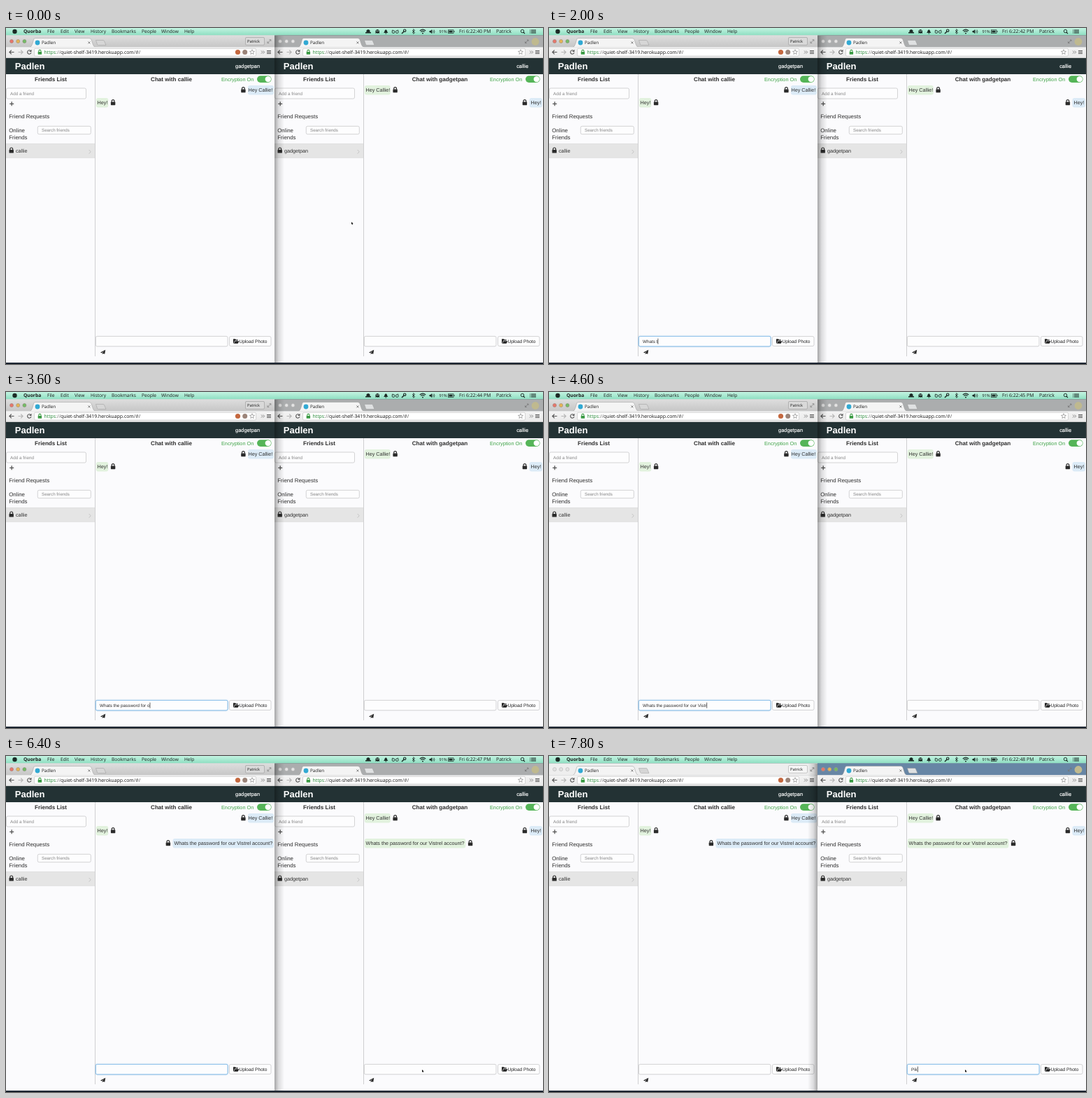
These frames come from a looping animation (768x480 px, 8 s). An HTML page:

```html
<!DOCTYPE html>
<html lang="en">
<head>
<meta charset="utf-8">
<title>Encrypted chat</title>
<style>
  html, body { margin: 0; width: 100%; height: 100%; overflow: hidden; background: #fbfbfd; }
  svg { display: block; width: 768px; height: 480px; }
  text { font-family: "Liberation Sans", Arial, sans-serif; text-rendering: geometricPrecision; white-space: pre; }
  .ui { font-family: "Open Sans", "Noto Sans", sans-serif; }
  .focus { opacity: 0; }
</style>
</head>
<body>
<svg id="stage" viewBox="0 0 768 480" xmlns="http://www.w3.org/2000/svg"></svg>
<script>
const APP = 'Padlen', OWNER = 'Patrick';
const USERS = ['gadgetpan', 'callie'];
const QUESTION = 'Whats the password for our Vistrel account?';
const INK = '#2e2e2e';

const attrs = o => Object.entries(o).map(([k, v]) => `${k}="${v}"`).join(' ');
const rect = (x, y, width, height, fill, more = {}) =>
  `<rect ${attrs({ x, y, width, height, fill, ...more })}/>`;
const dot = (cx, cy, r, fill, more = {}) => `<circle ${attrs({ cx, cy, r, fill, ...more })}/>`;
const shape = (d, fill, more = {}) => `<path ${attrs({ d, fill, ...more })}/>`;
const line = (d, stroke, w = 1, more = {}) =>
  shape(d, 'none', { stroke, 'stroke-width': w, ...more });
const text = (x, y, s, size, more = {}) =>
  `<text ${attrs({ x, y, 'font-size': size, fill: INK, ...more })}>${s}</text>`;
const ui = (x, y, s, size, more = {}) => text(x, y, s, size, { class: 'ui', fill: '#1a1a1a', ...more });
const group = (x, y, body, more = {}) => `<g transform="translate(${x} ${y})" ${attrs(more)}>${body}</g>`;

const END = { 'text-anchor': 'end' }, MID = { 'text-anchor': 'middle' }, BOLD = { 'font-weight': 700 };

// Icons are centred on the given point
const padlock = (x, y, color = '#2b2b2b') => group(x, y,
  rect(-3.2, -.8, 6.4, 4.6, color, { rx: .6 }) + line('M-1.9 -.6V-1.9A1.9 1.9 0 0 1 1.9 -1.9V-.6', color, 1.2));
const star = (x, y) => {
  let d = '';
  for (let i = 0; i < 10; i++) {
    const r = i % 2 ? 1.6 : 3.7, a = i * Math.PI / 5 - Math.PI / 2;
    d += (i ? 'L' : 'M') + (x + r * Math.cos(a)).toFixed(2) + ' ' + (y + r * Math.sin(a)).toFixed(2);
  }
  return shape(d + 'Z', '#fff', { stroke: '#888', 'stroke-width': .7 });
};
const bars = (x, y, color, w = 6) =>
  [-2, 0, 2].map(k => rect(x - w / 2, y + k - .5, w, 1, color)).join('');

function menuBar() {
  const items = [[59, 'File'], [78, 'Edit'], [98, 'View'], [121, 'History'], [151, 'Bookmarks'],
    [194, 'People'], [222, 'Window'], [255, 'Help']];
  const c = '#1c2b26';
  return rect(0, 0, 768, 10.2, 'url(#mint)') + dot(12.5, 5, 3.2, c) +
    ui(25, 7.4, 'Quorba', 6.7, BOLD) +
    items.map(([x, s]) => ui(x, 7.4, s, 6.6)).join('') +
    shape('M515.5 6V3.5Q518 .5 520.5 3.5V6H522V7.5H514V6Z', c) +
    shape('M528.5 8V4Q531.3 0 534 4V8L532.5 7L531.3 8L530 7Z', c) + dot(530.4, 4.3, .7, '#bfe9d8') + dot(532.4, 4.3, .7, '#bfe9d8') +
    shape('M540 7Q541.5 6 541.5 4Q543.3 .5 545 4Q545 6 546.5 7ZM542.5 7.5H544.2V8.5H542.5Z', c) +
    dot(554, 5.5, 1.9, 'none', { stroke: c, 'stroke-width': .9 }) +
    dot(559.3, 5.5, 1.9, 'none', { stroke: c, 'stroke-width': .9 }) + line('M552 4L553 2.5M561 4L560.4 2.5', c, .7) +
    line('M566 8L569.3 4.7', c, 1.5) + dot(570.2, 3.7, 1.7, 'none', { stroke: c, 'stroke-width': 1.2 }) +
    line('M581 3.2L584.6 6.6L582.8 8.4V1.6L584.6 3.4L581 6.8', c, .8) +
    line('M591.8 4Q596 .2 600.2 4M593.4 5.7Q596 3.2 598.6 5.7', c, 1.1) + dot(596, 7.4, 1, c) +
    shape('M605.5 4H607L609.3 2V8.2L607 6.2H605.5Z', c) + line('M610.5 3.5Q611.8 5 610.5 6.7M612 2.5Q614 5 612 7.7', c, .7) +
    ui(619.5, 7.2, '91%', 5.7) +
    rect(632.4, 2.8, 7.6, 4.6, 'none', { stroke: c, 'stroke-width': .7 }) + rect(633.4, 3.7, 5.2, 2.8, c) + rect(640.4, 4, 1, 2, c) +
    ui(648, 7.4, '', 6.9, { id: 'clock' }) + ui(701, 7.4, OWNER, 6.9) +
    dot(738.5, 4.5, 2.2, 'none', { stroke: c, 'stroke-width': 1 }) + line('M740 6L742 8.2', c, 1.2) +
    bars(754.5, 5, c, 7) + rect(749.2, 2.5, 1, 1, c) + rect(749.2, 4.5, 1, 1, c) + rect(749.2, 6.5, 1, 1, c);
}

function browser(side) {
  const first = side === 0, g = '#555', active = { class: 'light' + side };
  const lights = ['#e8776c', '#e6b656', '#74bd66'].map((c, i) =>
    dot(8 + i * 9.2, 19, 2.5, '#e3e3e3', { stroke: '#aaa', 'stroke-width': .5 }) +
    dot(8 + i * 9.2, 19, 2.5, c, { ...active, stroke: '#8a7a70', 'stroke-width': .4 })).join('');
  let s = rect(0, 10.2, 384, 17.3, first ? '#eeeeee' : '#abadae') +
    rect(0, 10.2, 384, 17.3, first ? 'url(#gray)' : '#6786a5', active) + lights +
    shape('M34 27.5Q36.5 27 38 22L39.5 16.5Q40 14.5 42 14.5H119Q121 14.5 122 16.5L124.5 24Q125.5 27 128 27.5Z', '#f4f4f4', { stroke: '#999', 'stroke-width': .5 }) +
    shape('M128.5 17.5H139Q140 17.5 140.5 18.5L143 24.5H132.5Q131 24.5 130.5 23.5Z', first ? '#d6d6d6' : '#dfe1e2', { stroke: '#999', 'stroke-width': .5 }) +
    dot(45, 21, 3.4, '#31a9d3') + ui(51, 23.2, APP, 6.3) +
    line('M117.4 19.4L120.4 22.4M120.4 19.4L117.4 22.4', '#666', .8) +
    rect(0, 27.2, 384, 16, 'url(#bar)') + line('M0 42.8H384', '#a6a6a6', .6) +
    rect(40.5, 29.3, first ? 317 : 318, 10.8, '#fff', { rx: 1.5, stroke: '#bdbdbd', 'stroke-width': .6 }) +
    line('M11.5 34.5H5M7.8 31.6L4.9 34.5L7.8 37.4', g, 1.2) +
    line('M17.5 34.5H24M21.2 31.6L24.1 34.5L21.2 37.4', '#b5b5b5', 1.2) +
    line('M35.3 32.6A2.7 2.7 0 1 0 36 35', g, 1.1) + shape('M36.5 30.7V34H33.2Z', g) +
    group(48.4, 34.6, `<g transform="scale(.85)">${padlock(0, 0, '#3a9a43')}</g>`) +
    ui(54.5, 37, '<tspan fill="#1f8530">https</tspan><tspan fill="#666">://</tspan>quiet-shelf-3419.herokuapp.com<tspan fill="#444">/#/</tspan>', 6.9, { fill: '#111' }) +
    star(352, 34.5) + line('M365 32.5L367 34.5L365 36.5M367.7 32.5L369.7 34.5L367.7 36.5', '#666', .8) + bars(376, 34.5, '#555');
  if (first) s += rect(342.5, 13.5, 27, 10.8, '#f5f5f5', { rx: 1.5, stroke: '#aaa', 'stroke-width': .6 }) +
    rect(342.5, 13.5, 27, 10.8, '#d9d9d9', { ...active, rx: 1.5, stroke: '#a0a0a0', 'stroke-width': .6 }) +
    ui(345, 21.2, OWNER, 5.7) + dot(331.5, 34.5, 3.6, '#c4683f') + dot(341.7, 34.5, 3.5, '#9b8479') +
    line('M374 21.5L378.8 16.7M376.5 16.7H378.8V19M374 19.2V21.5H376.3', '#888', .8);
  else s += dot(373, 19.5, 5.4, '#bfb98f') + line('M358.5 21.5L363 17M361 17H363V19M358.5 19.3V21.5H360.7', '#777', .8);
  return s;
}

const bubble = (x, y, w, fill) => rect(x, y, w, 13.4, fill, { rx: 3 });
function received(y, s, w, more = {}) {
  return `<g ${attrs(more)}>` + bubble(128.8, y, w, '#e2f2de') + text(130.6, y + 9.2, s, 7.2) + padlock(128.8 + w + 6.8, y + 6.4) + '</g>';
}
function sent(y, s, w, more = {}) {
  return `<g ${attrs(more)}>` + bubble(383 - w, y, w, '#dcebf7') + text(381.3, y + 9.2, s, 7.2, END) + padlock(383 - w - 6.6, y + 6.4) + '</g>';
}
const field = (x, y, w, h, more = {}) =>
  rect(x, y, w, h, '#fdfdfe', { rx: 2, stroke: '#c8c8ca', 'stroke-width': .8, ...more });

function page(side) {
  const me = USERS[side], pal = USERS[1 - side], hint = { fill: '#858585' };
  const chat = side === 0
    ? sent(82, 'Hey Callie!', 37) + received(100, 'Hey!', 17.5) + sent(118, QUESTION, 144.5, { id: 'ask0' })
    : received(82, 'Hey Callie!', 37) + sent(100, 'Hey!', 18.5) + received(118, QUESTION, 144.5, { id: 'ask1' });
  return rect(0, 43, 384, 435, '#fbfbfd') + rect(0, 43, 384, 23, '#233234') +
    text(12.8, 59.2, APP, 13, { ...BOLD, fill: '#fff' }) +
    text(363, 57.3, me, 7.4, { ...END, fill: '#fff', stroke: '#fff', 'stroke-width': .15 }) +
    text(64, 76, 'Friends List', 8.1, { ...MID, ...BOLD }) +
    text(236.5, 76, 'Chat with ' + pal, 8.1, { ...MID, ...BOLD }) +
    text(308, 75.6, 'Encryption On', 7.3, { fill: '#3fa347' }) +
    rect(359, 68.3, 20.6, 9.6, '#55b558', { rx: 4.8 }) + dot(374.8, 73.1, 4.2, '#fff') +
    line('M127.5 66V469', '#cfcfd1') +
    field(.5, 86, 114, 15) + text(6, 95.6, 'Add a friend', 6.3, hint) +
    line('M5.2 108.3H11.2M8.2 105.3V111.3', '#555', 1.3) +
    text(4.2, 128.8, 'Friend Requests', 7.9) + text(4.2, 148.6, 'Online', 7.9) + text(4.2, 158.6, 'Friends', 7.9) +
    field(45.3, 140.3, 76, 11.4) + text(51, 148.2, 'Search friends', 6.2, hint) +
    rect(0, 165.2, 127, 20.3, '#e5e5e5') + line('M0 165.4H127M0 185.4H127', '#d8d8d9', .6) +
    padlock(7.7, 174.8) + text(14, 178, pal, 7.2) + line('M118.7 174L121.2 176.8L118.7 179.6', '#bdbdbd', .8) +
    chat +
    field(128.4, 440.4, 188.6, 14.4) +
    field(128.4, 440.4, 188.6, 14.4, { class: 'focus', id: 'focus' + side, stroke: '#74b6ea', filter: 'url(#glow)' }) +
    text(134, 449.8, '', 6.3, { id: 'draft' + side }) + rect(134, 443.6, .7, 8, '#222', { id: 'caret' + side }) +
    field(319.5, 440.6, 59.5, 13.8) +
    shape('M325 450.5V444.3H328L329 445.3H331.8V446.6H327.3L325.5 450.5ZM327.7 447.2H333.6L331.6 450.8H325.9Z', '#222') +
    text(333.4, 450, 'Upload Photo', 6.6, { fill: '#222' }) +
    shape('M135 463.6L142.2 459.8L141.2 465.8L138.9 464.9L137.7 466.2V464.5L140.6 461.6L136.8 464.3Z', '#222');
}

const shade = (x, id, cls) => rect(x, 11, 14, 467, `url(#${id})`, { class: cls });
const ramp = (id, stops, dir = '') => `<linearGradient id="${id}" ${dir}>` +
  stops.map(([at, color, alpha = 1]) => `<stop ${attrs({ offset: at, 'stop-color': color, 'stop-opacity': alpha })}/>`).join('') +
  '</linearGradient>';
const DOWN = 'x2="0" y2="1"', FLIP = 'x1="1" x2="0"';
const FADE = [[0, '#000', .34], [.4, '#000', .13], [1, '#000', 0]];

document.getElementById('stage').innerHTML = '<defs>' +
  ramp('mint', [[0, '#c3f3e1'], [1, '#8fdfc2']], DOWN) +
  ramp('gray', [[0, '#dedede'], [1, '#c6c6c6']], DOWN) +
  ramp('bar', [[0, '#f4f4f4'], [1, '#e9e9e9']], DOWN) +
  ramp('fadeR', FADE) + ramp('fadeL', FADE, FLIP) +
  `<filter id="glow" x="-5%" y="-40%" width="110%" height="180%" color-interpolation-filters="sRGB"><feDropShadow dx="0" dy="0" stdDeviation=".8" flood-color="#66afe9" flood-opacity=".45"/></filter></defs>` +
  rect(0, 0, 768, 480, '#1b2430') +
  group(0, 0, browser(0) + page(0)) + group(384, 0, browser(1) + page(1)) +
  shade(384, 'fadeR', 'light0') + shade(370, 'fadeL', 'light1') + menuBar() +
  shape('M-1 -2L1.6 .6L.4 .7L.9 1.9L.2 2.1L-.3 .9L-1 1.5Z', '#111', { id: 'arrow' }) +
  line('M-.8 -1.8H.8M0 -1.8V1.8M-.8 1.8H.8', '#333', .5, { id: 'beam' });

const el = id => document.getElementById(id);
const show = (node, on) => { node.style.opacity = on ? 1 : 0; };
const STEP = 200, LOOP = 8000;
const LETTERS = [1, 3, 5, 7, 9, 12, 13, 15, 16, 18, 20, 24, 26, 26, 28, 30, 32, 34, 37, 40, 43];
const REPLY = [[7200, 'P'], [7600, 'Pi'], [7800, 'Pik']];
const TO_LEFT = [[495, 279], [430, 372], [300, 445], [180, 473], [117, 461], [148, 447], [148, 447]];
const TO_RIGHT = [[148, 447], [175, 463], [330, 476], [510, 470], [596, 450]];

function write(side, s, caret) {
  const draft = el('draft' + side);
  draft.textContent = s;
  const w = s ? draft.getComputedTextLength() : 0;
  el('caret' + side).setAttribute('x', 134.2 + w);
  show(el('caret' + side), caret);
}

function pointer(t) {
  const spot = t < 1400 ? TO_LEFT[t / STEP] : t < 5600 ? null : TO_RIGHT[Math.min(4, (t - 5600) / STEP)];
  const beam = t === 1000 || t === 1200 || t === 5600;
  for (const id of ['arrow', 'beam']) {
    show(el(id), spot && (id === 'beam') === beam);
    if (spot) el(id).setAttribute('transform', `translate(${spot})`);
  }
}

function render(ms) {
  const t = Math.floor(ms / STEP) * STEP;
  el('clock').textContent = `Fri 6:22:${40 + Math.floor((t + 800) / 1000)} PM`;

  const swapped = t >= 6600;
  document.querySelectorAll('.light0').forEach(n => show(n, !swapped));
  document.querySelectorAll('.light1').forEach(n => show(n, swapped));

  const typing = t >= 1400 && t < 5600;
  write(0, typing ? QUESTION.slice(0, LETTERS[(t - 1400) / STEP]) : '', t >= 1000 && t < 6200);
  const reply = REPLY.filter(r => t >= r[0]).pop();
  write(1, reply ? reply[1] : '', swapped);

  const fading = t === 6600;
  el('focus0').style.opacity = t < 1000 || t > 6600 ? 0 : fading ? .6 : 1;
  el('focus0').setAttribute('stroke', fading ? '#6fc4c0' : '#74b6ea');
  show(el('focus1'), t >= 6800);
  show(el('ask0'), t >= 5600);
  show(el('ask1'), t >= 5800);
  pointer(t);
}

const start = performance.now();
function tick() {
  render((performance.now() - start) % LOOP);
  requestAnimationFrame(tick);
}
tick();
</script>
</body>
</html>
```
